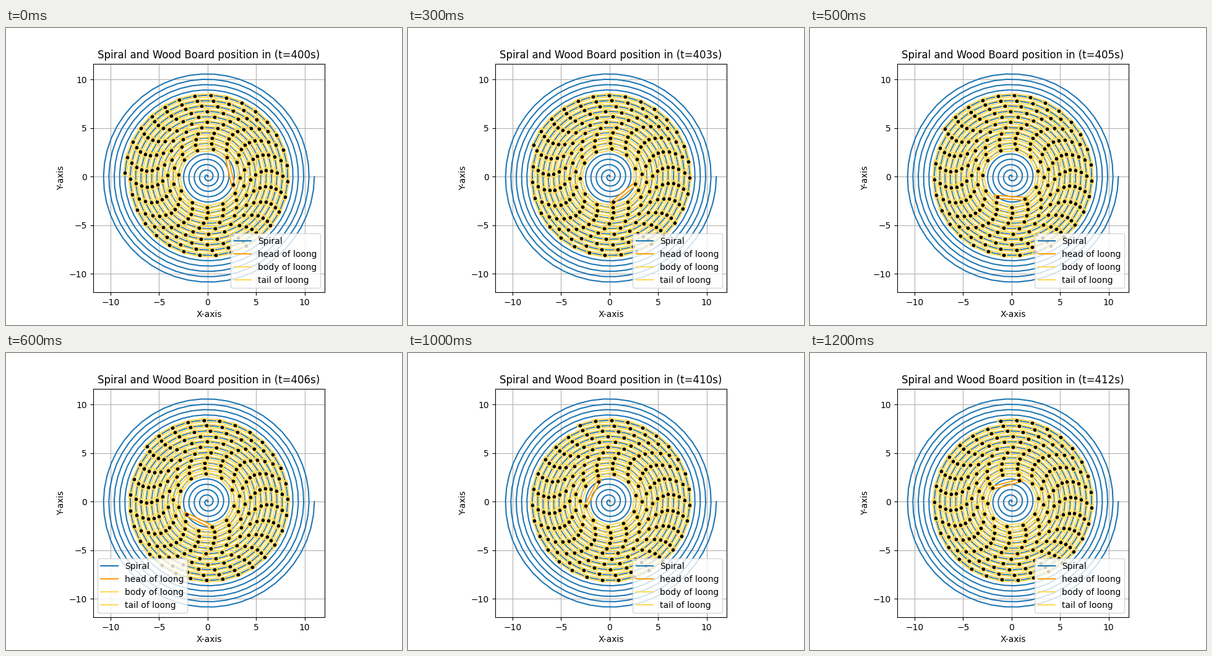
Animation of 640x480 px, one loop 1.3 s. Source, as a matplotlib script:

```python
import numpy as np
import matplotlib.pyplot as plt
from matplotlib.animation import FuncAnimation

PITCH = 0.55
B = PITCH / (2 * np.pi)
START = 32 * np.pi            # head angle at t = 0
T0, STEPS = 400, 13
BOARDS = 224
HEAD_GAP, BODY_GAP = 2.86, 1.65
OVERHANG, HALF_WIDTH = 0.275, 0.15
HEAD, BODY = "#ff9f0a", "#ffd95a"


def arc_length(theta):
    return B / 2 * (theta * np.hypot(1, theta) + np.arcsinh(theta))


def head_angle(t):
    """Angle of the head after t seconds at unit speed."""
    left = arc_length(START) - t
    theta = np.sqrt(2 * left / B)
    for _ in range(8):
        theta -= (arc_length(theta) - left) / (B * np.hypot(1, theta))
    return theta


def next_angle(theta, gap):
    """Angle of the following handle, a straight distance gap behind."""
    phi = theta + gap / (B * theta)
    for _ in range(8):
        c, s = np.cos(phi - theta), np.sin(phi - theta)
        f = theta**2 + phi**2 - 2 * theta * phi * c - (gap / B) ** 2
        phi -= f / (2 * phi - 2 * theta * c + 2 * theta * phi * s)
    return phi


def spiral(theta):
    return np.array([B * theta * np.cos(theta), B * theta * np.sin(theta)])


def handles(t):
    angles = [head_angle(t)]
    for i in range(BOARDS):
        angles.append(next_angle(angles[-1], BODY_GAP if i else HEAD_GAP))
    return spiral(np.array(angles))


def outline(p, q):
    """Closed rectangle of the board whose handles are p and q."""
    u = (q - p) / np.hypot(*(q - p))
    n = HALF_WIDTH * np.array([-u[1], u[0]])
    a, b = p - OVERHANG * u, q + OVERHANG * u
    return np.array([a + n, b + n, b - n, a - n, a + n]).T


fig, ax = plt.subplots(figsize=(6.4, 4.8), dpi=100)
ax.plot(*spiral(np.linspace(0, 40 * np.pi, 1000)), color="#1f77b4", label="Spiral")
ax.set_aspect("equal")
ax.set(xlabel="X-axis", ylabel="Y-axis")
ax.grid(True)
ax.set_xlim(ax.get_xlim())
ax.set_ylim(ax.get_ylim())

names = {0: "head of loong", 1: "body of loong", BOARDS - 1: "tail of loong"}
boards = [ax.plot([], [], color=BODY if i else HEAD, label=names.get(i))[0]
          for i in range(BOARDS)]
dots, = ax.plot([], [], "ko", ms=3, zorder=3)
title = ax.set_title("")
ax.legend(loc="best")


def update(k):
    t = T0 + k
    pts = handles(t)
    for line, p, q in zip(boards, pts.T, pts.T[1:]):
        line.set_data(*outline(p, q))
    dots.set_data(*pts)
    title.set_text(f"Spiral and Wood Board position in (t={t}s)")
    return [*boards, dots, title]


anim = FuncAnimation(fig, update, frames=STEPS, interval=100, repeat_delay=0)
plt.show()
```
